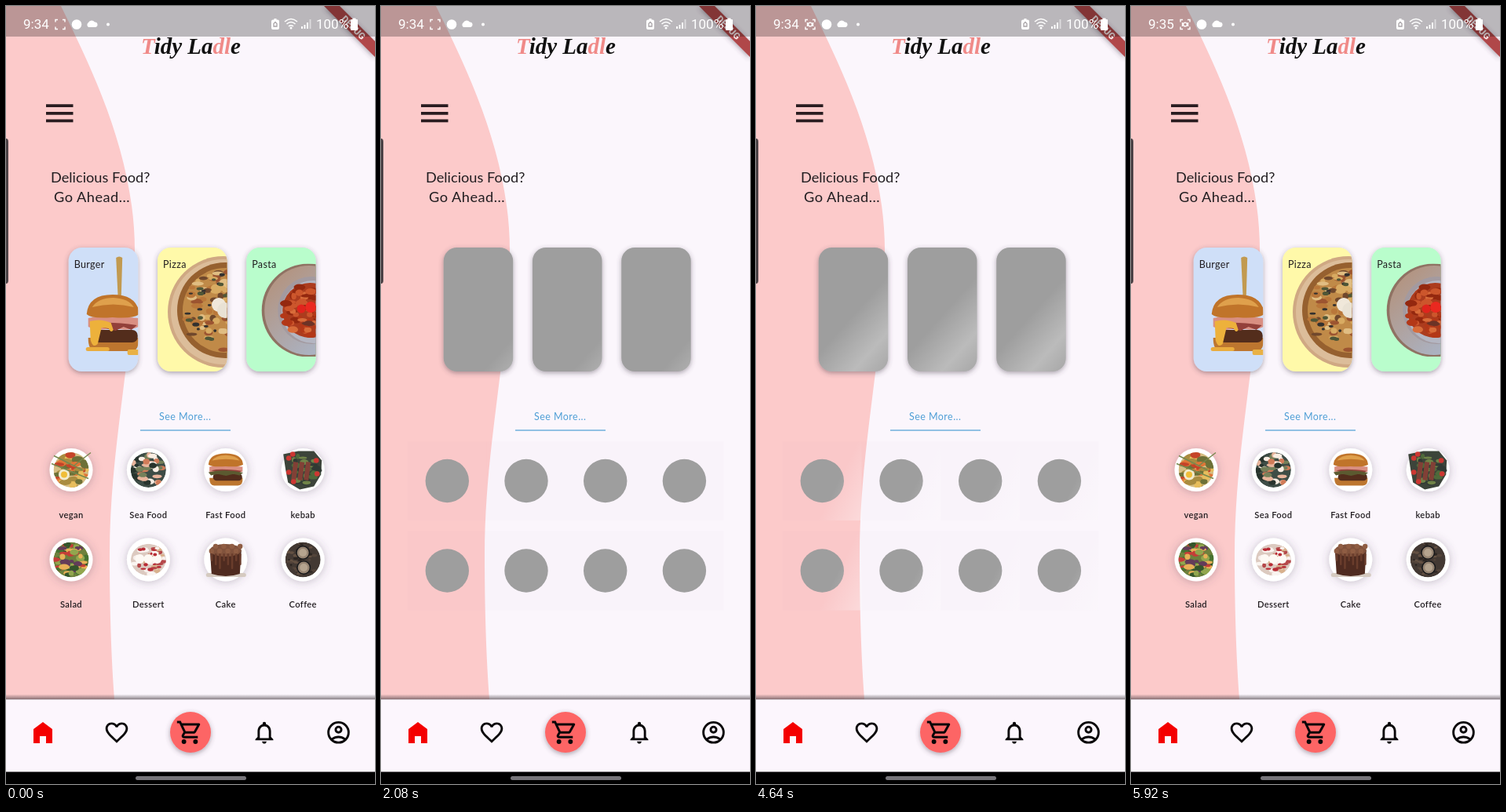
Write an HTML page that moves like this. It is 470 px wide and 992 px high and loops after 6160 ms.

```html
<!DOCTYPE html>
<html lang="en">
<head>
<meta charset="utf-8">
<title>Food app loading</title>
<style>
html, body { margin: 0; width: 100%; height: 100%; overflow: hidden; background: #fbf6fc; }
svg { display: block; width: 470px; height: 992px; }
text { font-family: Lato, "Open Sans", sans-serif; fill: #211d20; }
.status { font: 17px Roboto, sans-serif; fill: #fff; }
.logo { font: italic bold 29px "Liberation Serif", serif; fill: #111; }
.logo tspan { fill: #f08a88; }
.lead { font-size: 18.2px; }
.name { font-size: 12.5px; letter-spacing: .35px; }
.label { font-size: 11.2px; font-weight: 600; letter-spacing: .35px; text-anchor: middle; }
.debug { font: 900 11.7px Roboto, sans-serif; fill: #f6e8e8; text-anchor: middle; }
</style>
</head>
<body>
<svg viewBox="0 0 470 992">
  <defs>
    <filter id="drop" x="-30%" y="-30%" width="160%" height="160%">
      <feDropShadow dx="0" dy="2" stdDeviation="3" flood-color="#453c48" flood-opacity=".45"/>
    </filter>
    <filter id="glow" x="-60%" y="-60%" width="220%" height="220%">
      <feDropShadow dx="0" dy="1" stdDeviation="6" flood-color="#51465a" flood-opacity=".33"/>
    </filter>
    <linearGradient id="edge" x1="0" y1="0" x2="0" y2="1">
      <stop offset="0" stop-color="#40363c" stop-opacity="0"/>
      <stop offset="1" stop-color="#40363c" stop-opacity=".65"/>
    </linearGradient>
    <linearGradient id="plate" x1="0" y1=".2" x2=".7" y2="1">
      <stop offset="0" stop-color="#b3937f"/>
      <stop offset="1" stop-color="#aab6ca"/>
    </linearGradient>
    <clipPath id="cardClip"><rect width="88.5" height="158" rx="17"/></clipPath>
    <clipPath id="pastaClip"><rect y="20.5" width="88.5" height="118.5"/></clipPath>
    <clipPath id="dishClip"><circle r="22.5"/></clipPath>
  </defs>

  <rect width="470" height="992" fill="#fbf6fc"/>
  <path d="M0 0H70C109 80 164 190 164 312C164 438 132 558 132 700C132 770 134 830 138 884H0Z" fill="#fccaca"/>
  <text id="logo" class="logo" x="172" y="61"><tspan>T</tspan>idy La<tspan>dl</tspan>e</text>
  <path d="M51 127.200H85.500M51 136.800H85.500M51 146.400H85.500" stroke="#2a1c20" stroke-width="3.800"/>
  <text class="lead" x="57" y="225">Delicious Food?</text>
  <text class="lead" x="61" y="250" letter-spacing=".5">Go Ahead...</text>
  <text x="195" y="528" font-size="12.500" letter-spacing=".45" style="fill:#4f9fd6">See More...</text>
  <rect x="171" y="540.400" width="115" height="1.200" fill="#4f9fd6"/>

  <g id="food"></g>
  <g id="bones"></g>

  <rect y="877.500" width="470" height="7" fill="url(#edge)"/>
  <rect y="884.500" width="470" height="92.500" fill="#fcf6fd"/>
  <path d="M35 940V922L47 913L59 922V940H51V931H43V940Z" fill="#f40000"/>
  <circle cx="235" cy="926" r="26" fill="#fd6565" filter="url(#drop)"/>
  <g id="icons"></g>
  <rect y="976.500" width="470" height="15.500" fill="#000"/>
  <rect x="165" y="982" width="141" height="5" rx="2.500" fill="#77757a"/>

  <path d="M405 0H425L470 45V65Z" fill="#b04648" filter="url(#drop)"/>
  <text class="debug" transform="translate(442.500 27.500) rotate(45)" y="4">DEBUG</text>
  <rect width="470" height="39" fill="#000" opacity=".26"/>
  <path d="M0 169Q3 169 3 173V350Q3 354 0 354Z" fill="#4b4246"/>

  <text id="clock" class="status" x="22" y="29">9:34</text>
  <text class="status" x="395" y="29">100%</text>
  <g fill="none" stroke="#fff" stroke-width="1.400">
    <path d="M66 17.500H63V20.500M72 17.500H75V20.500M63 26.500V29.500H66M75 26.500V29.500H72"/>
    <g id="rec"><circle cx="69" cy="23.500" r="2.400"/><path d="M65.500 21V26M72.500 21V26"/></g>
    <path d="M355 20Q363 13 371 20M357.500 23Q363 18 368.500 23M360 26Q363 23.500 366 26" stroke-width="1.600"/>
    <path d="M377 29V26M380.500 29V24M384 29V21" stroke-width="1.900"/>
    <path d="M387.500 29V17" stroke-width="1.900" opacity=".5"/>
  </g>
  <g fill="#fff">
    <circle cx="90" cy="23.500" r="6.300"/>
    <path d="M105 27A3.600 3.600 0 0 1 105 21A4.800 4.800 0 0 1 113 20.500A3.300 3.300 0 0 1 114 27Z"/>
    <circle cx="130" cy="23.500" r="2"/>
    <circle cx="363" cy="28" r="1.500"/>
    <path d="M340 17.500H341.500V16H344.500V17.500H346Q348 17.500 348 19.500V28Q348 30 346 30H340Q338 30 338 28V19.500Q338 17.500 340 17.500Z"/>
    <path d="M440 17H441.500V15.500H445.500V17H447Q448 17 448 18V30Q448 31 447 31H440Q439 31 439 30V18Q439 17 440 17Z"/>
  </g>
  <path d="M341 26V22.500L343 20.500L345 22.500V26Z" fill="none" stroke="#a9a4a8" stroke-width="1.300"/>
</svg>
<script>
const $ = id => document.getElementById(id);
const LOOP = 6160;

let seed = 7;
const rnd = () => (seed = (seed * 16807) % 2147483647) / 2147483647;

const at = (x, y, body, extra = '') => `<g transform="translate(${x} ${y})${extra}">${body}</g>`;
const disc = (x, y, r, fill) => `<circle cx="${x}" cy="${y}" r="${r}" fill="${fill}"/>`;
const box = (x, y, w, h, rx, fill) =>
  `<rect x="${x}" y="${y}" width="${w}" height="${h}" rx="${rx}" fill="${fill}"/>`;
const path = (d, fill) => `<path d="${d}" fill="${fill}"/>`;

// Scattered toppings inside a circle of radius R
function bits(n, R, size, colors) {
  let out = '';
  for (let i = 0; i < n; i++) {
    const a = rnd() * 6.283, d = R * Math.sqrt(rnd());
    out += `<ellipse cx="${(d * Math.cos(a)).toFixed(1)}" cy="${(d * Math.sin(a)).toFixed(1)}"
      rx="${(size * (.6 + rnd())).toFixed(1)}" ry="${(size * (.4 + rnd() * .5)).toFixed(1)}"
      fill="${colors[i % colors.length]}"/>`;
  }
  return out;
}

// Burger, 66 wide and 72 high
const burger = sauce =>
  path('M2 55H66Q67 72 57 72H11Q2 72 2 55Z', '#bd762f') +
  box(9, 45, 56, 16, 7, '#532d1c') +
  path('M2 30Q20 25 66 30V41Q50 48 34 42Q18 48 2 41Z', '#d98f82') +
  path('M5 38Q24 33 64 39L57 45L47 41L37 46L20 42Z', '#93403a') +
  path('M0 25Q2 0 33 0Q65 0 67 25Q60 31 33 29Q6 31 0 25Z', '#c0742a') +
  path('M7 16Q15 4 34 4Q54 5 60 16Q34 9 7 16Z', '#dfa04c') +
  (sauce
    ? path('M4 34Q18 30 31 36L34 45Q31 50 28 43L19 42L14 63Q8 69 5 58Z', '#edb13b') + box(-1, 67, 30, 5, 2.5, '#e9ac3e')
    : path('M0 42Q33 34 67 43L60 49L48 46L34 50L18 46L5 49Z', '#5b5a30'));

const burgerCard =
  path('M60.500 13Q64.500 10 68.500 13L67 65H63Z', '#c29a50') +
  at(23, 60, burger(true)) + box(75, 130, 15, 7, 2, '#e9b145');

const pizzaCard = at(84, 82,
  disc(0, 0, 71, '#cfa883') + disc(0, 0, 67, '#dcbd9a') + disc(2, -2, 61, '#96602f') +
  disc(2, -2, 54, '#c08a48') +
  bits(120, 52, 5, ['#d8ab62', '#9c5430', '#e0bd82', '#70482c', '#b9773a']) +
  bits(36, 49, 3, ['#33312f', '#4f5636']) + disc(-6, -9, 9, '#f0e8da') + disc(2, -2, 10, '#e9e2d4'));

const pastaCard = `<g clip-path="url(#pastaClip)">` + at(79, 80,
  disc(0, 0, 59.5, '#8f7263') + disc(1, 0, 57, 'url(#plate)') +
  disc(4, 0, 43, '#a39aa0') + disc(6, 2, 40, '#b4b6c2') + disc(2, 0, 35, '#ac3c1e') +
  bits(80, 32, 5, ['#cc562c', '#94280f', '#d86c3a', '#b33818']) +
  disc(-9, -2, 5.5, '#e0241d') + disc(3, -4, 7, '#ea2920') +
  path('M-9 17Q2 9 9 18Q0 23 -9 17Z', '#6c3326')) + '</g>';

const bowl = (base, n, size, colors) =>
  `<g clip-path="url(#dishClip)">${disc(0, 0, 22.5, base)}${bits(n, 21, size, colors)}</g>`;

const cup = (x, y) => disc(x, y, 9, '#17181a') + disc(x, y, 7.5, '#978573') + disc(x, y, 5, '#b5a48f');

const dishes = [
  ['vegan', bowl('#d5bd83', 42, 5, ['#df7638', '#a98c40', '#c54429', '#e7bd5c', '#6d7138']) +
    disc(-9, 6, 7, '#f1ebcd') + disc(-9, 6, 4, '#f0bd38') +
    '<path d="M-25-8L22 11M-22-18L14 0M3-5L25-22" stroke="#77884e" stroke-width="1.400"/>'],
  ['Sea Food', bowl('#3e4d46', 40, 4.5, ['#e8b49b', '#faeee3', '#28342d', '#d17c59', '#75805a'])],
  ['Fast Food', at(-22, -21, burger(false), ' scale(.66 .57)')],
  ['kebab', path('M-25-20L-6-24L14-24L24-12L23 6L14 21L-4 25L-19 16L-22 0Z', '#3c443a') +
    bits(30, 19, 4, ['#4f6a3b', '#313a34', '#708448']) +
    [-9, -1, 7].map(x => `<path d="M${x}-10L${x - 3} 13" stroke="#814036" stroke-width="6"/>`).join('') +
    [[-18, -15], [-13, -20], [-18, 3], [17, -12], [18, 5], [-12, 15]].map(p => disc(...p, 3.3, '#cd3732')).join('')],
  ['Salad', bowl('#6e813d', 60, 4.5, ['#467331', '#c43d37', '#92a64e', '#633c59', '#e8b057', '#34552b'])],
  ['Dessert', `<g transform="scale(1 .9)">${bowl('#dccac0', 32, 4, ['#faf5f1', '#b5484a', '#d8b18d', '#f7efeb'])}</g>` +
    [-11, 0, 11].map(x => disc(x, -1, 6, '#fdf9f4')).join('') + bits(10, 17, 2.5, ['#b82c35'])],
  ['Cake', box(-25, 17, 51, 5, 2.5, '#d5cac0') + path('M-20-12H20L18 18Q0 24-18 18Z', '#4f2b20') +
    '<ellipse cy="-12" rx="20" ry="8" fill="#80523c"/>' +
    Array.from({ length: 8 }, (_, i) => disc(-18 + i * 5.2, -11 - (i % 2) * 6, 3.2, '#8f5d43') +
      box(-19 + i * 5.2, -8, 2.5, 10 + (i % 3) * 5, 1.2, '#6a3d2c')).join('')],
  ['Coffee', bowl('#433933', 40, 2.2, ['#2c2521', '#635042', '#53443a']) + cup(0, -9) + cup(1, 10)]
];

const cardX = [79.7, 193, 306.2];
const cards = [['Burger', '#cfdff8', burgerCard], ['Pizza', '#fff9a9', pizzaCard], ['Pasta', '#b9fdcc', pastaCard]];

$('food').innerHTML =
  cards.map(([name, fill, art], i) => at(cardX[i], 308,
    `<g filter="url(#drop)">${box(0, 0, 88.5, 158, 17, fill)}</g>
     <g clip-path="url(#cardClip)">${art}</g><text class="name" x="7" y="26">${name}</text>`)).join('') +
  dishes.map(([name, art], i) => at(83 + (i % 4) * 98.4, 591.5 + (i >> 2) * 114.5,
    `<g filter="url(#glow)">${disc(0, 0, 27.5, '#fff')}</g>${art}
     <text class="label" y="61">${name}</text>`)).join('');

const sweep = id => `<linearGradient id="${id}" gradientUnits="userSpaceOnUse">
  <stop offset="0" stop-color="#fff" stop-opacity="0"/>
  <stop offset=".5" stop-color="#fff" stop-opacity=".3"/>
  <stop offset="1" stop-color="#fff" stop-opacity="0"/></linearGradient>`;

$('bones').innerHTML = sweep('cardSweep') + sweep('tileSweep') +
  cardX.map(x => at(x, 308, `<g filter="url(#drop)">${box(0, 0, 88.5, 158, 17, '#9e9e9e')}</g>` +
    box(0, 0, 88.5, 158, 17, 'url(#cardSweep)'))).join('') +
  dishes.map((_, i) => at(34 + (i % 4) * 100.7, 555 + (i >> 2) * 114.5,
    box(0, 0, 100.7, 101, 0, 'rgba(150,140,155,.025)') + disc(50.3, 50.5, 27.7, '#9e9e9e') +
    box(0, 0, 100.7, 101, 0, 'url(#tileSweep)'))).join('');

const icons = [
  [141, 1.43, 'M16.5 3c-1.74 0-3.41.81-4.5 2.09C10.91 3.81 9.24 3 7.5 3 4.42 3 2 5.42 2 8.5c0 3.78 3.4 6.86 8.55 11.54L12 21.35l1.45-1.32C18.6 15.36 22 12.28 22 8.5 22 5.42 19.58 3 16.5 3zm-4.4 15.55l-.1.1-.1-.1C7.14 14.24 4 11.39 4 8.5 4 6.5 5.5 5 7.5 5c1.54 0 3.04.99 3.57 2.36h1.87C13.46 5.99 14.96 5 16.5 5c2 0 3.5 1.5 3.5 3.5 0 2.89-3.14 5.74-7.9 10.05z'],
  [234, 1.47, 'M15.55 13c.75 0 1.41-.41 1.75-1.03l3.58-6.49A1 1 0 0 0 20 4H5.21l-.94-2H1v2h2l3.6 7.59-1.35 2.44C4.52 15.37 5.48 17 7 17h12v-2H7l1.1-2zM6.16 6h12.15l-2.76 5H8.53zM7 18a2 2 0 1 0 0 4a2 2 0 1 0 0-4zm10 0a2 2 0 1 0 0 4a2 2 0 1 0 0-4z'],
  [329, 1.43, 'M12 22c1.1 0 2-.9 2-2h-4c0 1.1.9 2 2 2zm6-6v-5c0-3.07-1.63-5.64-4.5-6.32V4a1.5 1.5 0 0 0-3 0v.68C7.64 5.36 6 7.92 6 11v5l-2 2v1h16v-1zm-2 1H8v-6c0-2.48 1.51-4.5 4-4.5s4 2.02 4 4.5z'],
  [423.5, 1.43, 'M12 2a10 10 0 1 0 0 20a10 10 0 1 0 0-20zM7.35 18.5C8.66 17.56 10.26 17 12 17s3.34.56 4.65 1.5C15.34 19.44 13.74 20 12 20s-3.34-.56-4.65-1.5zm10.79-1.38C16.45 15.8 14.32 15 12 15s-4.45.8-6.14 2.12C4.7 15.73 4 13.95 4 12a8 8 0 0 1 16 0c0 1.95-.7 3.73-1.86 5.12zM12 6a3.5 3.5 0 1 0 0 7a3.5 3.5 0 1 0 0-7zm0 5a1.5 1.5 0 1 1 0-3a1.5 1.5 0 1 1 0 3z']
];
$('icons').innerHTML = icons.map(([x, k, d]) =>
  at(x, 926.3, `<path d="${d}" fill="#080608" fill-rule="evenodd"/>`, ` scale(${k}) translate(-12 -12)`)).join('');

// The screen holds still for a while at both ends of the loop
const holds = [[5920, LOOP], [5600, 5920], [5440, 5600], [880, 1040], [480, 880], [160, 480]];
function snap(t) {
  const hold = holds.find(([a, b]) => t >= a && t < b);
  return hold ? hold[0] : Math.floor(t / 80) * 80;
}

const show = (id, on) => { $(id).style.display = on ? '' : 'none'; };

function slide(id, w, h, pos) {
  const set = (k, v) => $(id).setAttribute(k, v);
  const a = pos - .4, b = pos + .4;
  set('x1', a * w); set('y1', a * h / 2);
  set('x2', b * w); set('y2', b * h / 2);
}

function draw(now) {
  const t = snap(now % LOOP);
  const loading = t >= 480 && t < 5440;
  show('food', !loading);
  show('bones', loading);
  show('logo', t < 480 || t >= 880);
  const blink = t % 1150;
  show('rec', blink > 20 && blink < 440);
  $('clock').textContent = t < 5200 ? '9:34' : '9:35';
  const pos = ((t - 80 + 3000) % 3000) / 1000 - .4;
  slide('cardSweep', 88.5, 158, pos);
  slide('tileSweep', 100.7, 101, pos);
}

const start = performance.now();
function tick() {
  draw(performance.now() - start);
  requestAnimationFrame(tick);
}
tick();
</script>
</body>
</html>
```
